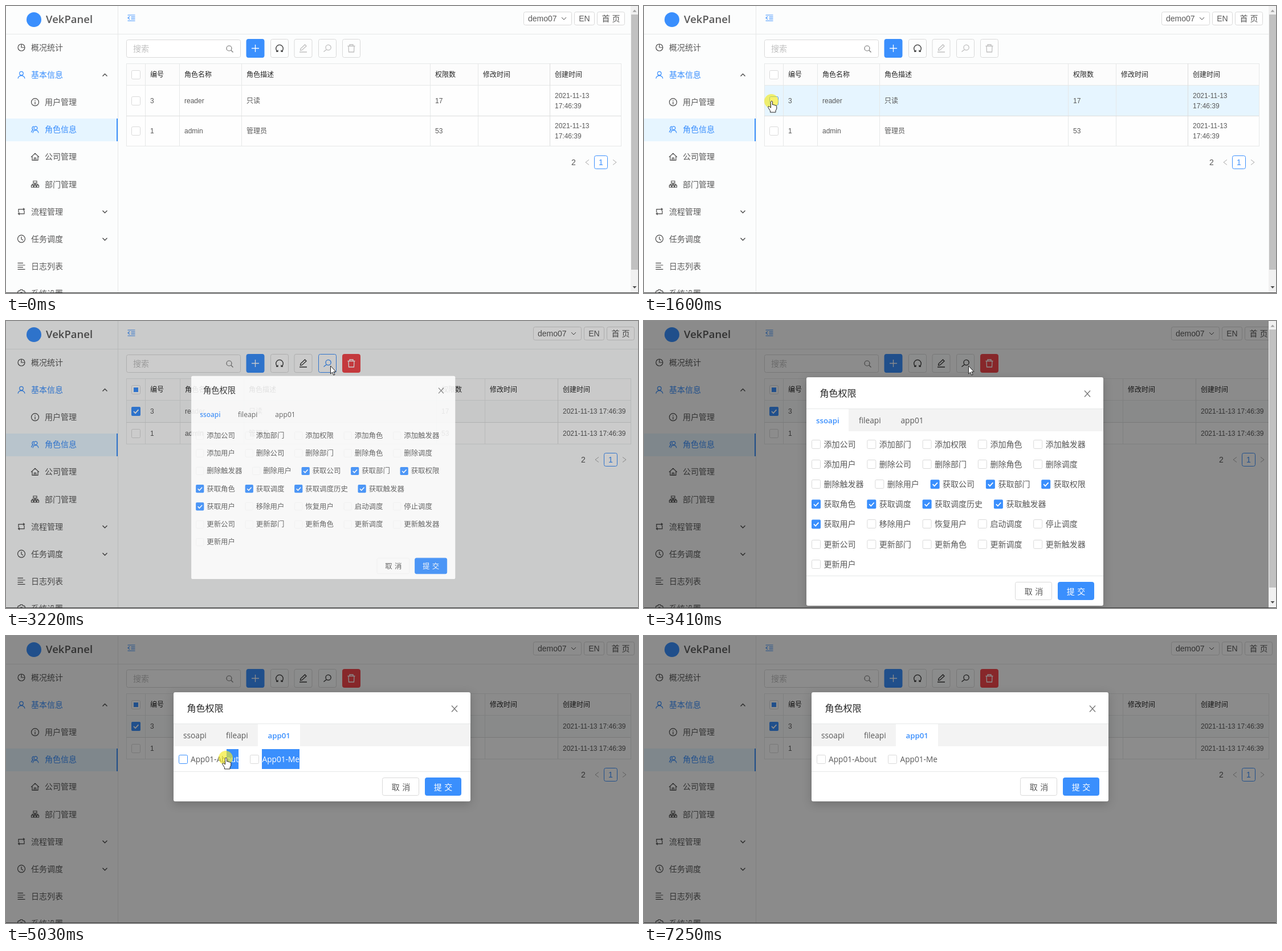
Write an HTML page that moves like this. It is 1109 px wide and 505 px high and loops after 7860 ms.

```html
<!DOCTYPE html>
<html lang="zh-CN">
<head>
<meta charset="utf-8">
<title>角色权限</title>
<style>
html, body { margin: 0; width: 100%; height: 100%; overflow: hidden; background: #fcfdfd; }
svg { display: block; width: 1109px; height: 505px; }
text { font: 14px "Liberation Sans", "Noto Sans CJK SC", "Noto Sans CJK", sans-serif; fill: #595959; white-space: pre; }
text.s { font-size: 12px; }
text.h { font-size: 12px; fill: #262626; }
text.m { font-family: "Open Sans", "Noto Sans CJK SC", "Noto Sans CJK", sans-serif; }
text.l { font-size: 13.7px; }
text.b { font-size: 13.3px; font-weight: 600; fill: #3a8ffd; }
text.mid { text-anchor: middle; word-spacing: 1px; }
.dialog { filter: drop-shadow(0 4px 8px rgba(0, 0, 0, .2)); }
.opening { filter: none; opacity: .87; }
</style>
</head>
<body>
<svg id="stage" viewBox="0 0 1109 505"></svg>
<script>
const BLUE = '#3a8ffd', INK = '#4a4a4a', GREY = '#bfbfbf', EDGE = '#d9d9d9', LINE = '#e6e8e8', FAINT = '#f6f6f6';
const LOOP = 7860;

// Each step holds until the next: time, pointer kind, x, y, and the changed settings.
const steps = [
  [0, '', 0, 0, { row: 0, glow: 0, picked: 0, wide: 0, mask: 0, dialog: '', hover: 0, bar: 1, sel: 0 }],
  [400, 'arrow', 316, 270],
  [600, 'arrow', 290, 236, { row: 2 }],
  [800, 'arrow', 256, 206],
  [1000, 'arrow', 232, 194],
  [1200, 'hand', 224, 167, { row: 0 }],
  [1600, 'hand', 224, 167, { row: 1, glow: 1 }],
  [1800, 'hand', 224, 167, { picked: 1 }],
  [2000, 'hand', 226, 166, { glow: 0 }],
  [2200, 'arrow', 340, 152],
  [2400, 'arrow', 491, 119, { row: 0 }],
  [2600, 'arrow', 573, 97],
  [2800, 'hand', 569, 79, { hover: 1 }],
  [3000, 'hand', 569, 79, { glow: 1 }],
  [3220, 'arrow', 569, 79, { glow: 0, wide: 1, mask: .2, dialog: 'opening', bar: 0 }],
  [3410, 'arrow', 569, 79, { mask: .45, dialog: 'all', hover: 0, bar: 1 }],
  [3610, 'arrow', 556, 104],
  [3820, 'arrow', 510, 152],
  [4010, 'hand', 474, 174],
  [4220, 'hand', 474, 174, { glow: 1 }],
  [4420, 'hand', 474, 176, { dialog: 'app', bar: 0, glow: 0 }],
  [4620, 'arrow', 524, 214, { glow: 1 }],
  [4820, 'hand', 452, 214, { sel: 452 }],
  [5030, 'hand', 386, 214, { sel: 387 }],
  [5220, 'hand', 360, 214, { sel: 360 }],
  [5430, 'hand', 334, 215, { sel: 334 }],
  [5640, 'hand', 317, 216, { sel: 324 }],
  [5830, 'hand', 344, 217, { sel: 344 }],
  [6040, 'hand', 392, 217, { sel: 392 }],
  [6240, 'hand', 430, 217, { sel: 430 }],
  [6450, 'arrow', 470, 222, { sel: 0, glow: 0 }],
  [6650, 'arrow', 560, 240],
  [6850, 'arrow', 642, 258],
  [7050, 'arrow', 692, 264],
  [7250, '', 0, 0]
];
let last = {};
const states = steps.map(([at, kind, x, y, set]) => last = { ...last, at, kind, x, y, ...set });

const text = (x, y, s, cls = '', more = '') => `<text x="${x}" y="${y}" class="${cls}" ${more}>${s}</text>`;
const rect = (x, y, w, h, fill, more = '') => `<rect x="${x}" y="${y}" width="${w}" height="${h}" fill="${fill}" ${more}/>`;
const box = (x, y, w, h, edge = EDGE, fill = '#fff', r = 3) =>
  rect(x + .5, y + .5, w - 1, h - 1, fill, `stroke="${edge}" rx="${r}"`);
const path = (d, color = LINE, w = 1) => `<path d="${d}" fill="none" stroke="${color}" stroke-width="${w}"/>`;
const icon = (x, y, d, color = INK, w = 1.2) => `<g transform="translate(${x} ${y})">${path(d, color, w)}</g>`;
const disc = r => `M${-r} 0a${r} ${r} 0 1 1 ${2 * r} 0a${r} ${r} 0 1 1 ${-2 * r} 0`;
const check = (x, cy, on, edge = EDGE) => on
  ? rect(x, cy - 8, 16, 16, BLUE, 'rx="2"') + path(`M${x + 4} ${cy}l3 3.2 5.4-6`, '#fff', 1.8)
  : box(x, Math.round(cy - 8), 16, 16, edge, '#fff', 2);

const UP = 'M-4 2L0-2 4 2', DOWN = 'M-4-2L0 2 4-2';
const shapes = {
  pie: disc(6) + 'M0-6V0H6',
  user: 'M-3.3-2.5a3.3 3.3 0 1 1 6.6 0a3.3 3.3 0 1 1-6.6 0M-6 6.5C-5-.2 5-.2 6 6.5',
  info: disc(6.5) + 'M0-1V4M0-3.8V-2.3',
  team: 'M-2-2.5a3 3 0 1 1 6 0a3 3 0 1 1-6 0M-4 6C-3-.2 5-.2 6 6M-2-5.5C-6-5-6 0-3 .5Q-6 1.5-6.5 5',
  home: 'M-7 .5L0-6 7 .5M-5-1V6H5V-1M-1.5 6V2H1.5V6',
  tree: 'M-3-5.5H3V-2H-3ZM0-2V2M-5 2V.2H5V2M-6.5 2H-3V5.5H-6.5ZM-1.7 2H1.7V5.5H-1.7ZM3 2H6.5V5.5H3Z',
  swap: 'M-5 2V-4H5M3-6L5.5-4 3-2M5-2V4H-5M-3 6L-5.5 4-3 2',
  clock: disc(6.5) + 'M0-4V.5L3 2.5',
  lines: 'M-6.5-5.5H3M-6.5-1.8H6.5M-6.5 1.9H3M-6.5 5.6H6.5',
  gear: 'M-2-6.5H2L3-4.5 5.5-4.5 7-1 5.5 0 7 1 5 5H-5L-7 1-5.5 0-7-1-5.5-4.5-3-4.5Z' + disc(2.2),
  fold: 'M-6.5-5H6.5M-.5-1.7H6.5M-.5 1.7H6.5M-6.5 5H6.5M-3-2.5L-6 0-3 2.5',
  plus: 'M-6.5 0H6.5M0-6.5V6.5',
  reload: 'M-3.5 5.5A6.3 6.3 0 1 1 3.5 5.5M-6 5.7H-3V3M6 5.7H3V3',
  edit: 'M-6.5 6.5H6.5M-5 3.5L-4.5 .5 3-6.5 5.5-4-2 3Z',
  find: 'M-3-1.5a4.6 4.6 0 1 1 9.2 0a4.6 4.6 0 1 1-9.2 0M-1.5 2L-6.5 6',
  bin: 'M-6.5-4H6.5M-3-4V-6.5H3V-4M-5-4L-4.5 6.5H4.5L5-4',
  glass: 'M-5.5-1a4.5 4.5 0 1 1 9 0a4.5 4.5 0 1 1-9 0M2.5 2.5L6 6'
};

const menu = [
  ['pie', '概况统计'], ['user', '基本信息', 0, UP], ['info', '用户管理', 1], ['team', '角色信息', 1],
  ['home', '公司管理', 1], ['tree', '部门管理', 1], ['swap', '流程管理', 0, DOWN],
  ['clock', '任务调度', 0, DOWN], ['lines', '日志列表'], ['gear', '系统设置']
];

function sidebar() {
  let s = rect(0, 198, 196, 40, '#e6f5ff') + rect(194, 198, 2, 40, BLUE);
  s += `<circle cx="49" cy="24" r="13" fill="${BLUE}"/>`;
  s += text(70, 30, 'VekPanel', 'm', 'style="font-size:18.5px;font-weight:600"');
  menu.forEach(([shape, label, sub = 0, arrow], i) => {
    const y = 73 + i * 48.1, x = 27 + sub * 24, lit = i == 1 || i == 3;
    s += icon(x, y, shapes[shape], lit ? BLUE : INK);
    s += text(x + 17, y + 5, label, '', lit ? `style="fill:${BLUE}"` : '');
    if (arrow) s += icon(173.5, y + .5, arrow, INK, 1.4);
  });
  return s + path('M196.5 0V505M0 49.5H1109');
}

function topbar(dx) {
  const cells = [[908, 85, ''], [997, 36, 'EN'], [1037, 49, '首 页']];
  return icon(220, 21, shapes.fold, BLUE) + cells.map(([x, w, s]) =>
    box(x + dx, 10, w, 24) + text(x + dx + w / 2, 26.5, s, 'mid', 'style="word-spacing:0"')).join('') +
    text(916 + dx, 26.5, 'demo07') + icon(979 + dx, 22, DOWN, INK, 1);
}

function toolbar(st) {
  const ink = st.picked ? '#333' : GREY;
  let s = box(211, 59, 201, 32) + text(223, 80, '搜索', '', `style="fill:${GREY}"`) + icon(392.5, 75.5, shapes.glass, '#777');
  const tool = (x, shape, color, edge = EDGE, fill = '#fdfefe') =>
    box(x, 58, 32, 33, edge, fill) + icon(x + 16, 74.5, shapes[shape], color, 1.3);
  s += tool(421.5, 'plus', '#fff', BLUE, BLUE) + tool(464, 'reload', '#333') + tool(505.5, 'edit', ink);
  s += tool(548, 'find', st.hover ? BLUE : ink, st.hover ? BLUE : EDGE);
  return s + (st.picked ? tool(590, 'bin', '#fff', '#f5474c', '#f5474c') : tool(590, 'bin', GREY));
}

function table(st) {
  const cols = st.wide ? [211, 244, 305, 417, 755, 840, 968, 1096] : [211, 244, 304, 413, 744, 828, 954, 1079];
  const ys = st.wide ? [101, 139, 178, 216] : [101, 139, 193, 246];
  const end = cols[7], col = i => cols[i] + 9;
  const rows = [['3', 'reader', '只读', '17'], ['1', 'admin', '管理员', '53']];
  let s = rect(cols[0], ys[0], end - cols[0], 38, '#fcfcfc');
  rows.forEach((_, i) => {
    const fill = st.row == i + 1 ? '#e6f5ff' : i == 0 && st.picked ? '#f9fafa' : '#fefefe';
    s += rect(cols[0], ys[i + 1], end - cols[0], ys[i + 2] - ys[i + 1], fill);
  });
  s += path(ys.map(y => `M${cols[0]} ${y + .5}H${end}`).join('') + cols.map(x => `M${x + .5} ${ys[0]}V${ys[3] + 1}`).join(''));
  s += path(`M${cols[6] + .5} ${ys[0]}V${ys[3]}M${cols[0]} ${ys[2] + .5}H${end}`, '#dcdddd');
  ['编号', '角色名称', '角色描述', '权限数', '修改时间', '创建时间'].forEach((h, i) => s += text(col(i + 1), 125, h, 'h'));
  s += check(220, 121, 0) + (st.picked ? rect(224, 117, 8, 8, BLUE) : '');
  rows.forEach((cells, i) => {
    const y = (ys[i + 1] + ys[i + 2]) / 2 + .5;
    s += check(220, y, i == 0 && st.picked, i == 0 && st.row == 1 ? BLUE : EDGE);
    cells.forEach((c, j) => s += text(col(j + 1), y + 4, c, 's'));
    s += st.wide ? text(col(6), y + 4, '2021-11-13 17:46:39', 's')
      : text(col(6), y - 5, '2021-11-13', 's') + text(col(6), y + 13, '17:46:39', 's');
  });
  const dx = st.wide * 17, y = 275 - st.wide * 31;
  return s + text(992 + dx, y + 5, '2') + icon(1020 + dx, y, 'M3-4.5L-3 0 3 4.5', '#aaa', 1) +
    box(1032 + dx, y - 12, 24, 24, BLUE) + text(1044 + dx, y + 4.5, '1', 'mid', `style="fill:${BLUE}"`) +
    icon(1068 + dx, y, 'M-3-4.5L3 0-3 4.5', '#aaa', 1);
}

const grants = [
  '添加公司 添加部门 添加权限 添加角色 添加触发器', '添加用户 删除公司 删除部门 删除角色 删除调度',
  '删除触发器 删除用户 获取公司 获取部门 获取权限', '获取角色 获取调度 获取调度历史 获取触发器',
  '获取用户 移除用户 恢复用户 启动调度 停止调度', '更新公司 更新部门 更新角色 更新调度 更新触发器', '更新用户'
];

function grantList(edge) {
  return grants.map((line, i) => {
    let x = 9;
    const y = 217 + i * 35.1;
    return line.split(' ').map(name => {
      const s = check(x, y, name.startsWith('获取'), edge) + text(x + 21.5, y + 5, name, 'm');
      x += 41.3 + 14 * name.length;
      return s;
    }).join('');
  }).join('');
}

function appList(sel) {
  const labels = fill => text(30, 222, 'App01-About', 'm l', fill) + text(155.5, 222, 'App01-Me', 'm l', fill);
  let s = check(9, 217, 0, sel && sel < 410 ? BLUE : EDGE) + check(134, 217, 0, sel > 425 && sel < 516 ? BLUE : EDGE) + labels('');
  if (!sel) return s;
  const spans = [[30, 114], [155, 221]].map(([a, b]) => [Math.max(a, sel - 294), b]).filter(([a, b]) => b > a);
  const bars = spans.map(([a, b]) => rect(a, 199, b - a, 35, BLUE)).join('');
  return s + bars + `<clipPath id="sel">${bars}</clipPath><g clip-path="url(#sel)">${labels('style="fill:#fff"')}</g>`;
}

function dialog(st) {
  if (!st.dialog) return '';
  const app = st.dialog == 'app', opening = st.dialog == 'opening';
  const h = app ? 192 : 402, foot = app ? 238 : 448, tab = app ? 148 : 0;
  const edge = opening ? FAINT : EDGE;
  let s = rect(0, 99, 521, h, '#fff', 'rx="3"');
  if (!opening) {
    s += rect(0, 154, 521, 40, '#f3f3f3') + rect(tab, 154, 74, 40, '#fff');
    s += path(`M0 154.5H521M0 ${foot + .5}H521`);
  }
  s += text(23.5, 133, '角色权限', 'm', 'style="font-size:16px;fill:#262626"');
  s += icon(493, 128, 'M-5-5.5L5 5.5M5-5.5L-5 5.5', '#777', 1.3);
  [[17, 'ssoapi'], [92, 'fileapi'], [165.5, 'app01']].forEach(([x, name], i) =>
    s += text(x, 180, name, i == (app ? 2 : 0) ? 'm b' : 'm l'));
  s += app ? appList(st.sel) : grantList(edge);
  s += box(366, foot + 11, 65, 32, edge) + text(399, foot + 32.5, '取 消', 'm mid');
  s += box(441, foot + 11, 64, 32, BLUE, BLUE) + text(473, foot + 32.5, '提 交', 'm mid', 'style="fill:#fff"');
  const place = opening ? 'translate(570.5 80.7) scale(.889) translate(-276 -81)' : `translate(${app ? 294 : 285} 0)`;
  return `<g class="dialog ${st.dialog}" transform="${place}">${s}</g>`;
}

function scrollbar(st) {
  if (!st.bar) return '';
  return rect(1096, 0, 13, 504, '#f1f1f1') + rect(1097, 15, 12, st.wide ? 454 : 449, '#c1c1c1') +
    '<path d="M1099.5 10.5l3.5-4 3.5 4z" fill="#a3a3a3"/><path d="M1099.5 493l3.5 4 3.5-4z" fill="#505050"/>';
}

const pointers = {
  arrow: 'M.5 0V14L3.7 11 5.8 16.2 8 15.3 5.9 10.2H10Z',
  hand: 'M-1.5 1.2Q0-1 1.5 1.2V7Q3 5.5 4 7.4Q5.6 6.3 6.5 8.2Q8.6 7.6 8.8 9.8V14L7 17V20H-2.5V17.5L-6.2 11.5Q-6.6 9 -4.2 9.7L-1.5 12Z'
};

function pointer(st) {
  if (!st.kind) return '';
  const glow = st.glow ? `<circle cx="${st.x - .5}" cy="${st.y + .5}" r="12.5" fill="#f2ea20" opacity=".65"/>` : '';
  return glow + `<path transform="translate(${st.x} ${st.y})" d="${pointers[st.kind]}" fill="#fff" stroke="#222" stroke-linejoin="round"/>`;
}

const scene = st => rect(0, 0, 1109, 505, '#fcfdfd') + sidebar() + topbar(st.wide * 17) + toolbar(st) + table(st) +
  (st.mask ? rect(0, 0, 1109, 505, '#000', `opacity="${st.mask}"`) : '') +
  dialog(st) + scrollbar(st) + rect(0, 504, 1109, 1, '#3c3d3d') + pointer(st);

const stage = document.getElementById('stage');
const start = performance.now();
let shown;
function tick() {
  const now = (performance.now() - start) % LOOP;
  const st = states.filter(s => s.at <= now).pop();
  if (st !== shown) stage.innerHTML = scene(shown = st);
  requestAnimationFrame(tick);
}
tick();
</script>
</body>
</html>
```
